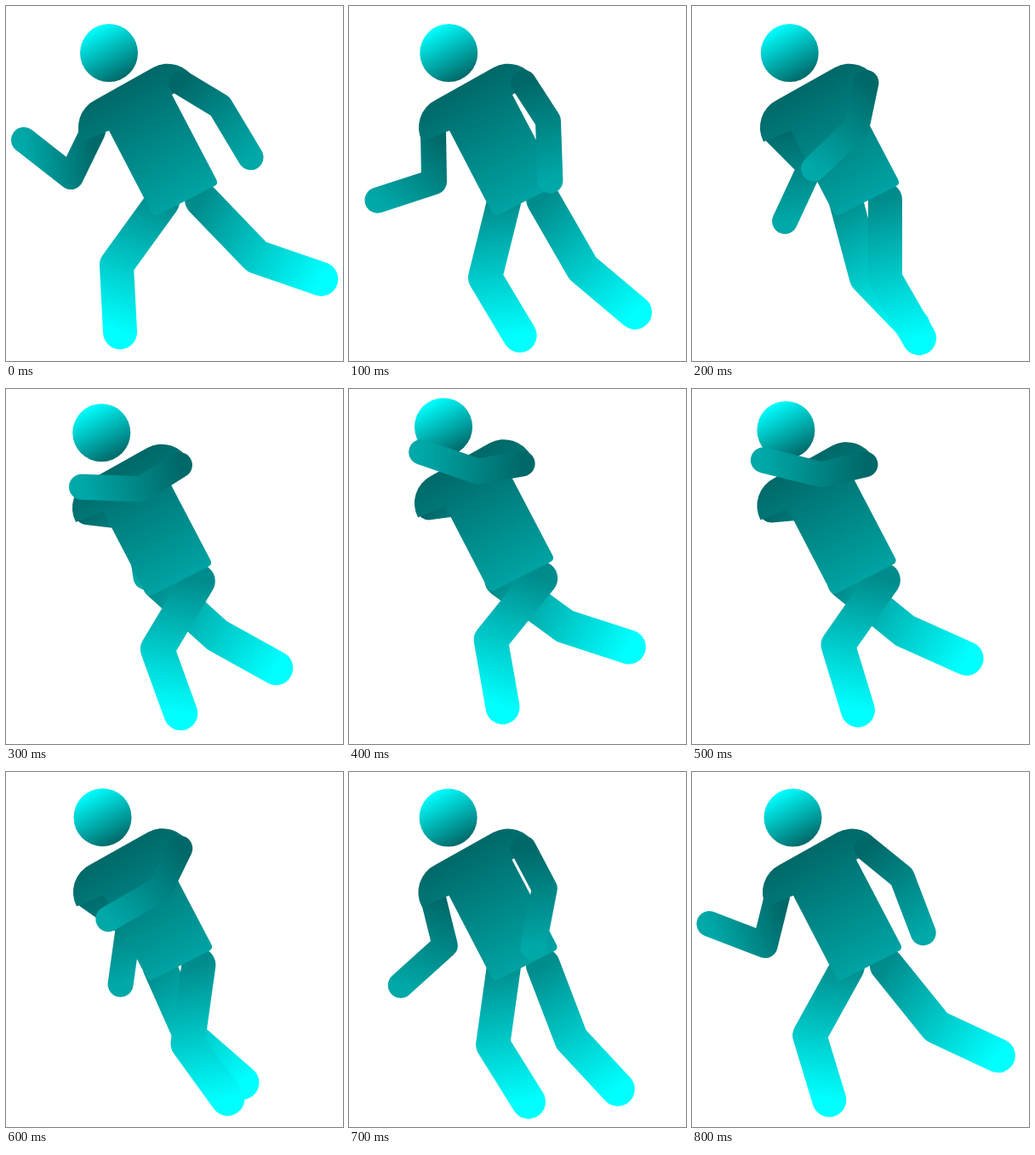
These frames come from a looping animation (396 by 416 pixels, 900 ms). An HTML page with a canvas:

```html
<!DOCTYPE html>
<html lang="en">
<head>
<meta charset="utf-8">
<title>Runner</title>
<style>
  html, body { margin: 0; width: 100%; height: 100%; overflow: hidden; background: #fff; }
  canvas { display: block; }
</style>
</head>
<body>
<canvas width="396" height="416"></canvas>
<script>
const ctx = document.querySelector('canvas').getContext('2d');
const STEP = 100;
const TORSO = new Path2D(
  'M89 159A36 36 0 0 1 105 110L173 72A36 36 0 0 1 222 87L195 104' +
  'L247 203Q250 208 245 211L180 244Q174 247 171 242L121 146Z');

// One row per limb; each entry is [upper, lower] joint angle in degrees, clockwise from the right.
const farArm = {
  root: [102, 147], follow: 1, lengths: [59, 70], width: 30, colors: ['#006868', '#00a8a8'],
  poses: [[116, 218], [89, 162], [45, 115], [7, 81], [-8, 60], [-5, 60], [35, 98], [76, 138], [104, 201]]
};
const nearArm = {
  root: [206, 90], follow: .3, lengths: [53, 70], width: 30, colors: ['#006868', '#00a8a8'],
  poses: [[31, 59], [57, 88], [102, 136], [148, 182], [170, 199], [167, 194], [116, 150], [62, 101], [39, 69]]
};
const farLeg = {
  root: [184, 229], follow: .6, lengths: [92, 79], width: 40, colors: ['#008c8c', '#00ffff'],
  poses: [[126, 87], [104, 59], [75, 46], [42, 29], [36, 18], [39, 24], [66, 41], [98, 58], [119, 73]]
};
const nearLeg = {
  root: [230, 227], follow: .6, lengths: [93, 80], width: 40, colors: ['#008c8c', '#00ffff'],
  poses: [[46, 19], [60, 40], [90, 60], [121, 70], [129, 80], [125, 73], [98, 54], [69, 47], [51, 25]]
};
const sway = [[0, 0], [-3, 0], [-5, 0], [-7, -3], [-8, -8.5], [-8.5, -5.5], [-6, -1.5], [-3.5, -1.2], [-2, -1.2]];

function gradient(from, to, colors) {
  const g = ctx.createLinearGradient(...from, ...to);
  colors.forEach((color, i) => g.addColorStop(i, color));
  return g;
}

const shift = ([x, y], [dx, dy], k) => [x + dx * k, y + dy * k];

function reach([x, y], degrees, length) {
  const a = degrees * Math.PI / 180;
  return [x + length * Math.cos(a), y + length * Math.sin(a)];
}

function drawLimb(limb, pose, offset) {
  const [upper, lower] = limb.poses[pose];
  const root = shift(limb.root, offset, limb.follow);
  const joint = reach(root, upper, limb.lengths[0]);
  const end = reach(joint, lower, limb.lengths[1]);
  ctx.lineWidth = limb.width;
  ctx.strokeStyle = gradient(root, end, limb.colors);
  ctx.beginPath();
  ctx.moveTo(...root);
  ctx.lineTo(...joint);
  ctx.lineTo(...end);
  ctx.stroke();
}

function drawTorso(offset) {
  ctx.save();
  ctx.translate(...offset);
  ctx.fillStyle = gradient([139, 91], [210, 226], ['#006868', '#00a2a2']);
  ctx.fill(TORSO);
  ctx.restore();
}

function drawHead(offset) {
  const [x, y] = shift([121, 55], offset, 1.25);
  ctx.fillStyle = gradient([x - 16, y - 30], [x + 16, y + 30], ['#00ffff', '#006868']);
  ctx.beginPath();
  ctx.arc(x, y, 34, 0, Math.PI * 2);
  ctx.fill();
}

function draw(now) {
  const pose = Math.floor(now / STEP) % sway.length;
  const offset = sway[pose];
  ctx.clearRect(0, 0, 396, 416);
  ctx.lineCap = ctx.lineJoin = 'round';
  drawLimb(farArm, pose, offset);
  drawLimb(farLeg, pose, offset);
  drawLimb(nearLeg, pose, offset);
  drawTorso(offset);
  drawHead(offset);
  drawLimb(nearArm, pose, offset);
}

const start = performance.now();
function tick() {
  draw(performance.now() - start);
  requestAnimationFrame(tick);
}
tick();
</script>
</body>
</html>
```
